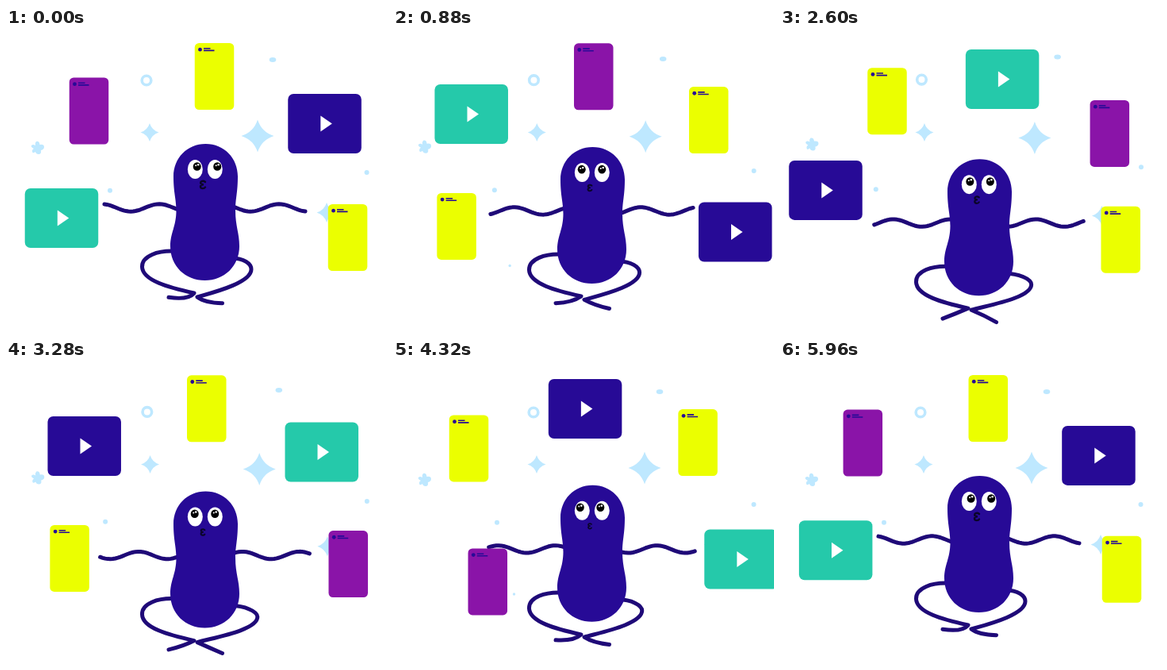
These frames come from a looping animation (480x383 px, 6 s). An HTML page:

```html
<!DOCTYPE html>
<html lang="en">
<head>
<meta charset="utf-8">
<title>Juggling cards</title>
<style>
  html, body { margin: 0; width: 100%; height: 100%; overflow: hidden; background: #fff; }
  svg { display: block; width: 100%; height: 100%; }
  .limb { fill: none; stroke: #1f0a78; stroke-width: 5; stroke-linecap: round; stroke-linejoin: round; }
</style>
</head>
<body>
<svg id="stage" viewBox="0 0 480 383">
  <g id="sparkles" fill="#bee8ff"></g>
  <path id="legL" class="limb"/><path id="legR" class="limb"/>
  <path id="armL" class="limb"/><path id="armR" class="limb"/>
  <g id="body">
    <path fill="#270a96" d="M251.5 146C275 146 292 164 292 187C292 208 289 215 289 230C289 250 294 258 294 275
      C294 300 275 318 250.5 318C226 318 207 300 207 275C207 258 214.5 250 214.5 230C214.5 215 211 208 211 187C211 164 228 146 251.5 146Z"/>
    <g fill="#fff"><ellipse cx="238.3" cy="178" rx="9.5" ry="12"/><ellipse cx="263.3" cy="178" rx="9.5" ry="12"/></g>
    <g id="pupils">
      <ellipse cx="238.3" cy="174.2" rx="5" ry="5.3"/><ellipse cx="263.8" cy="174.2" rx="5" ry="5.3"/>
      <g fill="#fff"><circle cx="236.8" cy="173" r="1"/><circle cx="239.8" cy="172" r="1.3"/>
      <circle cx="262.3" cy="173" r="1"/><circle cx="265.3" cy="172" r="1.3"/></g>
    </g>
    <path id="mouth" fill="none" stroke="#0a0528" stroke-width="2.4" stroke-linecap="round" d="M3-3.5C0-6-4-4-2.5-1.5Q-1.5-.3 1-.3Q-3-.3-3 2.3C-2.6 5.5 2 5 3 3"/>
  </g>
  <g id="cards"></g>
</svg>
<script>
const LOOP = 6000, STEP = 1200, TAU = Math.PI * 2;
const NAVY = '#270a96', YELLOW = '#ebff00', PURPLE = '#8a14a8', TEAL = '#25c9aa';
const byId = id => document.getElementById(id);

function add(parent, tag, attrs) {
  const el = document.createElementNS('http://www.w3.org/2000/svg', tag);
  for (const key in attrs) el.setAttribute(key, attrs[key]);
  return parent.appendChild(el);
}
const move = (el, x, y, extra = '') => el.setAttribute('transform', `translate(${x} ${y})${extra}`);
const ease = p => (1 - Math.cos(Math.PI * p)) / 2;

// Card route: lower left, upper left, top, upper right, lower right.
const PHASES = [0, .1, .2, .3, .4, .5, .6, .733, 1];
const ROUTE = [
  [[70, 239.5], [64, 227], [56, 192], [62, 159], [70, 141], [80.5, 127], [95.5, 111.5], [98.7, 108.5]],
  [[104.5, 104.5], [112, 101], [150, 87], [201.5, 72], [215, 67], [225.5, 63.5], [242, 61.5], [252.7, 61.3]],
  [[262.5, 61], [266, 61.5], [290, 67], [328.5, 81.5], [355, 87], [375.5, 93], [384, 104], [397.7, 116]],
  [[401.5, 120.5], [405, 123], [421, 140], [434, 167.5], [436, 214], [432.5, 244], [438.5, 251], [431.2, 257]],
  [[430.5, 264], [430, 265], [428.5, 268], [417.5, 277.5], [265, 317], [140.5, 290.5], [119.5, 279.5], [80.2, 250]]
];
ROUTE.forEach((leg, i) => leg.push(ROUTE[(i + 1) % 5][0]));

// Monotone cubic interpolation, so cards never overshoot a point.
function sample(values, p) {
  const last = PHASES.length - 1;
  let i = 0;
  while (i < last - 1 && p > PHASES[i + 1]) i++;
  const slope = k => (values[k + 1] - values[k]) / (PHASES[k + 1] - PHASES[k]);
  const tangent = k => {
    if (k === 0 || k === last) return 0;
    const a = slope(k - 1), b = slope(k);
    return a * b > 0 ? 2 * a * b / (a + b) : 0;
  };
  const h = PHASES[i + 1] - PHASES[i], u = (p - PHASES[i]) / h, w = 1 - u;
  return values[i] * w * w * (1 + 2 * u) + values[i + 1] * u * u * (3 - 2 * u)
    + h * u * w * (w * tangent(i) - u * tangent(i + 1));
}

function makeCard(fill, wide) {
  const g = add(byId('cards'), 'g', {});
  const [w, h, rx] = wide ? [92.5, 75, 7] : [49.5, 84, 5.5];
  add(g, 'rect', { x: -w / 2, y: -h / 2, width: w, height: h, rx, fill });
  if (wide) {
    add(g, 'path', { d: 'M-5.2-10L9.3 0L-5.2 10Z', fill: '#fff' });
  } else {
    add(g, 'circle', { cx: -18, cy: -33.8, r: 2.4, fill: NAVY });
    add(g, 'path', { d: 'M-13.5-35.2h8.5M-13.5-32.6h13.5', stroke: NAVY, 'stroke-width': 1.6 });
  }
  return g;
}
const cards = [[TEAL, true], [PURPLE, false], [YELLOW, false], [NAVY, true], [YELLOW, false]]
  .map(([fill, wide]) => makeCard(fill, wide));

function star(r) {
  const k = r * .24;
  return ['path', { d: `M0 ${-r}Q${k} ${-k} ${r} 0Q${k} ${k} 0 ${r}Q${-k} ${k} ${-r} 0Q${-k} ${-k} 0 ${-r}Z` }];
}
const dot = (rx, ry = rx) => ['ellipse', { rx, ry }];

// Each sparkle: shape, home x and y, drift x and y.
const sparkles = [
  [star(20.5), 317, 136, 4, 2.5],
  [star(11.5), 181, 131.5, 1, 0],
  [star(12.5), 404, 232.5, 1.5, 4],
  [['circle', { r: 5.8, fill: 'none', stroke: '#bee8ff', 'stroke-width': 3.6 }], 177, 66, 1.5, -1],
  [['path', { d: 'M-2-8Q2-9 2.5-4Q8-5 8-1Q8 2 4 3Q5 8 1 8Q-2 8-3 5Q-7 8-7 4Q-7 2-5 1Q-9-1-8-3Q-6-5-3-3Q-4-6-2-8Z' }], 40, 151, .5, -4.5],
  [dot(4.3, 3), 336, 40, 14, -3.5],
  [dot(3), 454.5, 182, .5, -7],
  [dot(3), 131, 204.7, -10.5, -1.5],
  [dot(1.7), 152.5, 295, -18, 15]
].map(([[tag, attrs], x, y, dx, dy]) => ({ el: add(byId('sparkles'), tag, attrs), x, y, dx, dy }));
const speck = sparkles[sparkles.length - 1].el;

function drawArm(id, side, t, sway, bob) {
  let d = '';
  for (let i = 0; i <= 32; i++) {
    const reach = 30 + (96.5 + 5.5 * sway) * i / 32;
    const wave = Math.cos(TAU * ((93.5 - reach) / 72 - 3 * t / LOOP));
    d += `${i ? 'L' : 'M'}${250.5 + side * reach} ${226.5 + bob - side * 4.7 * wave}`;
  }
  byId(id).setAttribute('d', d);
}

function drawLegs(t, sway, bob) {
  const curl = (1 + Math.cos(TAU * (t / LOOP - .9))) / 2;
  const drop = 13 - 8.5 * curl;
  const y = v => v + bob;
  const ankle = 339 + .85 * bob, knee = 309 + 8 * sway;
  byId('legL').setAttribute('d', `M218 ${y(281.5)}C190 ${y(279)} 171 ${y(288)} 171.5 ${y(301)}
    C172 ${y(318)} 205 ${y(327)} 237 ${y(334)}Q${222 + 8 * curl} ${y(334 + drop / 2 + 7 * curl)} 205 ${y(334 + drop)}`);
  byId('legR').setAttribute('d', `M284 ${y(290)}C300 ${y(290)} ${knee} ${y(297)} ${knee} ${y(304)}
    C${knee} ${y(321)} 262 ${ankle - 6} 241 ${ankle}Q${257 - 7 * curl} ${ankle + drop / 2 + 5 * curl} 272.5 ${ankle + drop + 2.5}`);
}

function render(t) {
  const phase = t % STEP / STEP, step = Math.floor(t / STEP);
  const sway = ease(2 * t / LOOP), bob = 20 * sway;
  const beat = Math.cos(TAU * phase);

  cards.forEach((card, i) => {
    const leg = ROUTE[(i + step) % 5];
    move(card, sample(leg.map(p => p[0]), phase), sample(leg.map(p => p[1]), phase));
  });

  move(byId('body'), 0, bob);
  move(byId('pupils'), -.3 + 2.7 * beat, .3 * beat);
  move(byId('mouth'), 248, 197.5, ` scale(${.83 + .17 * beat})`);
  drawArm('armL', -1, t, sway, bob);
  drawArm('armR', 1, t, sway, bob);
  drawLegs(t, sway, bob);

  const drift = t < 2400 ? ease(t / 2400) : t < 4300 ? ease((4300 - t) / 1900) : 0;
  for (const s of sparkles) move(s.el, s.x + s.dx * drift, s.y + s.dy * drift);
  speck.setAttribute('visibility', (t > 400 && t < 1700) || (t > 3700 && t < 5700) ? 'visible' : 'hidden');
}

const start = performance.now();
function tick() {
  render((performance.now() - start) % LOOP);
  requestAnimationFrame(tick);
}
tick();
</script>
</body>
</html>
```
